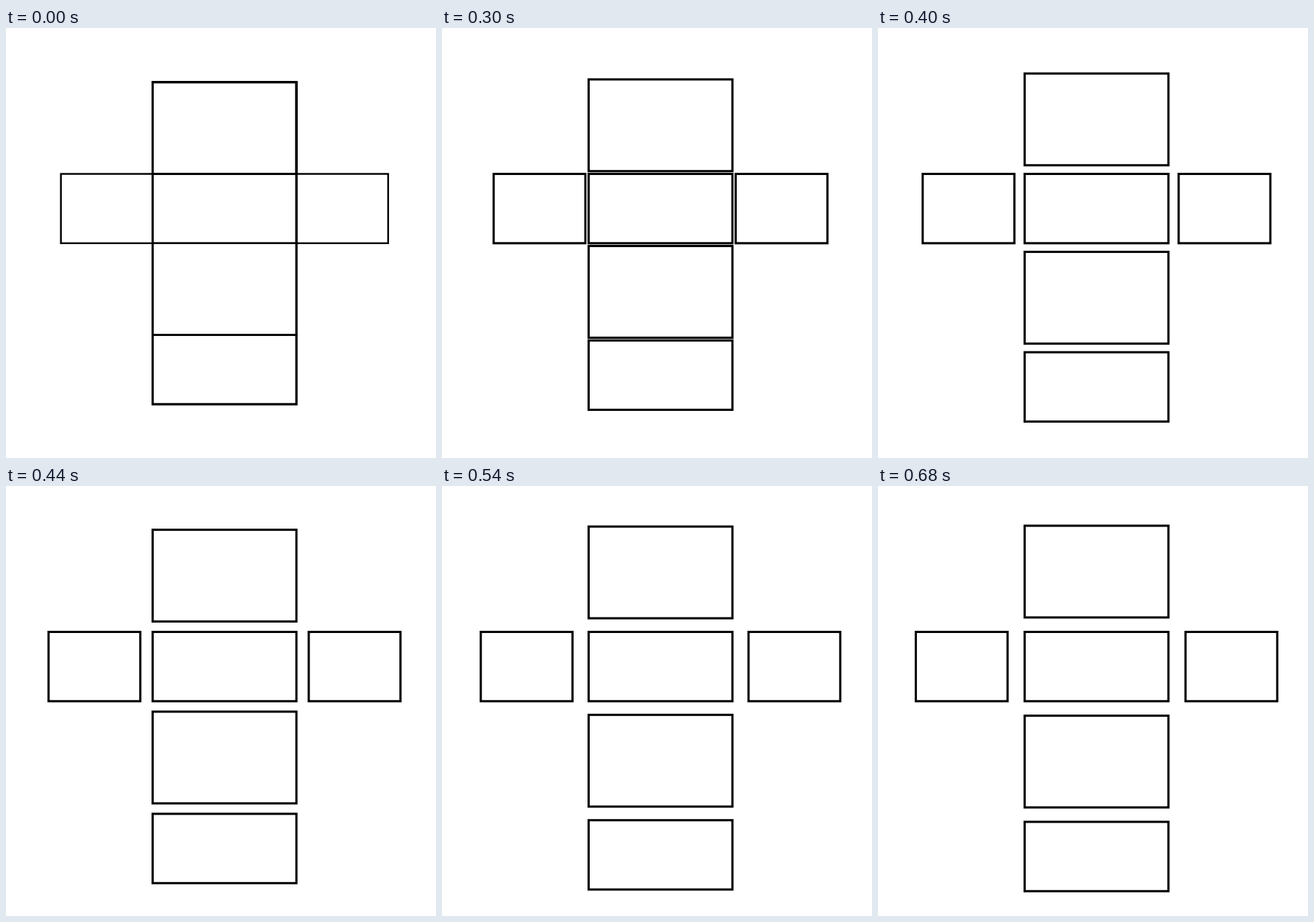
Animation of 585 by 585 pixels, one loop 2380 ms. Source, as an HTML page with a canvas:

```html
<!DOCTYPE html>
<html lang="en">
<head>
<meta charset="utf-8">
<title>Unfolded box</title>
<style>
  html, body { margin: 0; width: 100%; height: 100%; overflow: hidden; background: #fff; }
  canvas { display: block; }
</style>
</head>
<body>
<canvas id="stage" width="585" height="585"></canvas>
<script>
const ctx = document.getElementById('stage').getContext('2d');
const LOOP = 2380, START = 240, LAST_STEP = 13;

// The box: its three edge lengths and the top left corner of its net
const WIDTH = 195.6, DEPTH = 124.8, HEIGHT = 94.3;
const LEFT = 199.5, TOP = 73.7;
const GAP_X = 23.3, GAP_Y = 19.7;
const BOLD = 3, THIN = 2.4;

function box(x, y, w, h, weight) {
  ctx.lineWeight = weight;
  ctx.lineWidth = weight;
  ctx.strokeRect(x, y, w, h);
}

// Column of four panels with one panel on each side of the second
function drawPanels(spread, weight) {
  let y = TOP;
  for (let i = 0; i < 4; i++) {
    const h = i % 2 ? HEIGHT : DEPTH;
    box(LEFT, y + (i - 1) * GAP_Y * spread, WIDTH, h, weight);
    y += h;
  }
  const sideY = TOP + DEPTH, shift = GAP_X * spread;
  box(LEFT - DEPTH - shift, sideY, DEPTH, HEIGHT, weight);
  box(LEFT + WIDTH + shift, sideY, DEPTH, HEIGHT, weight);
}

// Closed net: thin seams and sides, bold column and top panel
function drawClosed() {
  drawPanels(0, THIN);
  box(LEFT, TOP, WIDTH, 2 * (DEPTH + HEIGHT), BOLD);
  box(LEFT, TOP, WIDTH, DEPTH, BOLD);
}

// Soft start, quick middle, long slow end
const ease = step => 1 - Math.exp(-(((step + 1.6) / 6.87) ** 2.4));

// Steps run at 30 per second, snapped to a 20 ms grid
const stepAt = t => Math.min(LAST_STEP,
  Math.floor((Math.floor((t - START) / 20) + 0.6) * 3 / 5));

function draw(t) {
  ctx.fillStyle = '#fff';
  ctx.fillRect(0, 0, 585, 585);
  ctx.strokeStyle = '#000';
  if (t < START) drawClosed();
  else drawPanels(ease(stepAt(t)), BOLD);
}

const begin = performance.now();
function tick() {
  draw((performance.now() - begin) % LOOP);
  requestAnimationFrame(tick);
}
tick();
</script>
</body>
</html>
```
